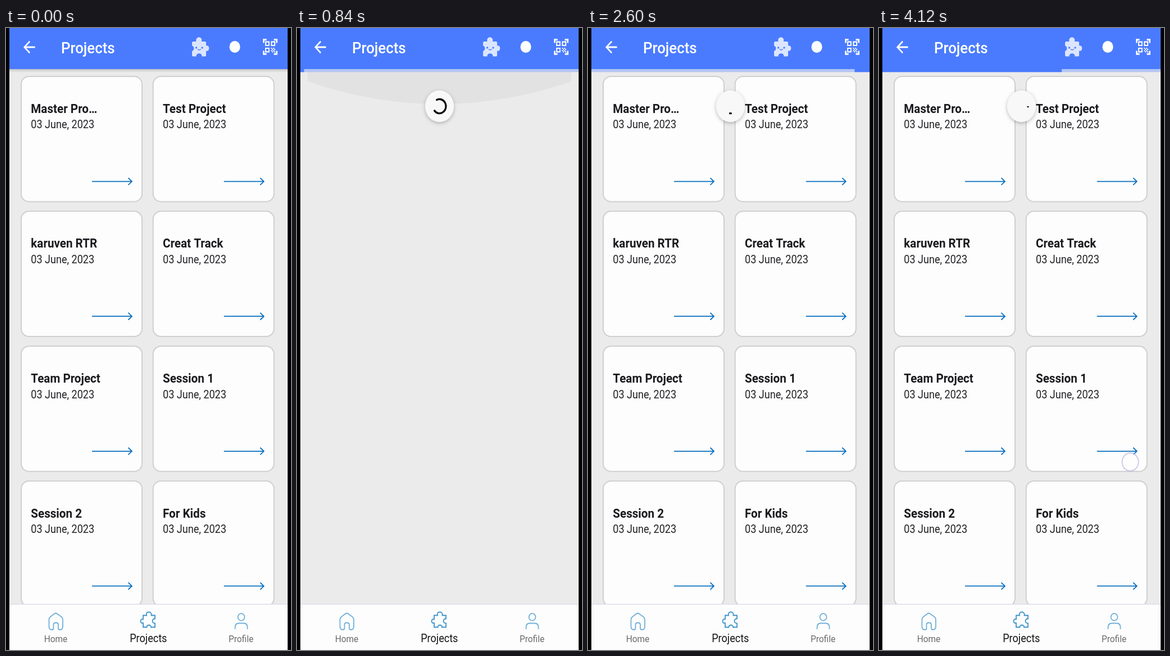
Animation of 507x1105 px, one loop 4160 ms. Source, as an HTML page with a canvas:

```html
<!DOCTYPE html>
<html lang="en">
<head>
<meta charset="utf-8">
<title>Projects</title>
<style>
  html, body { margin: 0; width: 100%; height: 100%; overflow: hidden; background: #000; }
  canvas { display: block; width: 100vw; height: 100vh; }
</style>
</head>
<body>
<canvas id="stage" width="507" height="1105"></canvas>
<script>
const ctx = document.getElementById('stage').getContext('2d');
const LOOP = 4160;
const LEFT = 6, WIDTH = 495, HEADER = 73, NAV = 1024;
const BLUE = '#4a7bff', LINK = '#0b70bf', INK = '#1a1a1e';
// The screen is slightly narrower than its natural proportions.
const DP = 1.418, SQUEEZE = 0.91;

const CARDS = ['Master Pro…', 'Test Project', 'karuven RTR', 'Creat Track',
  'Team Project', 'Session 1', 'Session 2', 'For Kids'];

const ICONS = {
  back: 'M20 11H7.83l5.59-5.59L12 4l-8 8 8 8 1.41-1.41L7.83 13H20z',
  scan: 'M2 7V2h5v2H4v3zM17 2h5v5h-2V4h-3zM22 17v5h-5v-2h3v-3zM7 22H2v-5h2v3h3z' +
    'M5 5h6v6H5zM6.5 6.5v3h3v-3zM13 5h6v6h-6zM14.5 6.5v3h3v-3zM5 13h6v6H5zM6.5 14.5v3h3v-3z' +
    'M13 13h1.5v1.5H13zM16 13h1.5v1.5H16zM14.5 14.5H16V16h-1.5zM17.5 14.5H19V16h-1.5z' +
    'M13 16h1.5v1.5H13zM16 16h1.5v1.5H16zM14.5 17.5H16V19h-1.5zM17.5 17.5H19V19h-1.5z',
  piece: 'M333 24H338.5C336 14 350.500 14 348 24H354Q356 24 356 26V31.500C363 29 363 43 356 40.500' +
    'V48.500Q356 50.500 354 50.500H348.500C349 43.500 338 43.500 338.500 50.500H333Q331 50.500 331 48.500' +
    'V41C335.500 40 335.500 32.500 331 31.500V26Q331 24 333 24Z',
  home: 'M76.5 1063V1051Q76.5 1048 79 1046L85.5 1041Q88.5 1038.5 91.5 1041L98.5 1046Q101 1048 101 1051' +
    'V1063Q101 1069 96 1069Q93 1069 93 1066V1060Q93 1056.5 88.7 1056.5Q84.5 1056.5 84.5 1060V1066' +
    'Q84.5 1069 81.5 1069Q76.5 1069 76.5 1063Z',
  projects: 'M244 1043.5H250C247.5 1035.500 260.500 1035.500 258.500 1043.5H265V1049.500' +
    'C259 1049 259 1058 265 1057.5V1064.5H258C258.500 1059.500 250 1059.500 250.500 1064.5H244V1057' +
    'C238 1059 238 1048.5 244 1050.5Z',
  profile: 'M407.5 1068V1065Q407.5 1057.5 414 1057.5H423Q429.5 1057.5 429.5 1065V1068' +
    'M412.500 1046.500a6 6.300 0 1 0 12 0a6 6.300 0 1 0 -12 0'
};

const clamp = (v, a = 0, b = 1) => Math.min(b, Math.max(a, v));
const ramp = (t, from, to) => clamp((t - from) / (to - from));
const smooth = x => x * x * (3 - 2 * x);

// Linear interpolation through [time, value] pairs.
function track(t, keys) {
  for (let i = 1; i < keys.length; i++) {
    const [t0, v0] = keys[i - 1], [t1, v1] = keys[i];
    if (t <= t1) return v0 + (v1 - v0) * ramp(t, t0, t1);
  }
  return keys[keys.length - 1][1];
}

function bezier(x, x1, y1, x2, y2) {
  const at = (s, a, b) => 3 * (1 - s) ** 2 * s * a + 3 * (1 - s) * s * s * b + s ** 3;
  let lo = 0, hi = 1;
  for (let i = 0; i < 20; i++) {
    const mid = (lo + hi) / 2;
    if (at(mid, x1, x2) < x) lo = mid; else hi = mid;
  }
  return at(lo, y1, y2);
}
const fastOutSlowIn = x => bezier(x, 0.4, 0, 0.2, 1);

function squeezed(x, y, paint, scale = 1) {
  ctx.save();
  ctx.translate(x, y);
  ctx.scale(SQUEEZE * scale, scale);
  paint();
  ctx.restore();
}

function rect(x, y, w, h, color) {
  ctx.fillStyle = color;
  ctx.fillRect(x, y, w, h);
}

function text(label, x, y, size, weight, color, align = 'left') {
  squeezed(x, y, () => {
    ctx.font = `${weight} ${size * DP}px Roboto, sans-serif`;
    ctx.textAlign = align;
    ctx.fillStyle = color;
    ctx.fillText(label, 0, 0);
  });
}

function stroke(path, color, width) {
  ctx.strokeStyle = color;
  ctx.lineWidth = width;
  ctx.stroke(new Path2D(path));
}

function glyph(path, x, y) {
  squeezed(x, y, () => {
    ctx.translate(-12, -12);
    ctx.fillStyle = '#fff';
    ctx.fill(new Path2D(path), 'evenodd');
  }, DP);
}

function disc(radius, color) {
  ctx.beginPath();
  ctx.arc(0, 0, radius, 0, Math.PI * 2);
  ctx.fillStyle = color;
  ctx.fill();
}

function card(title, index) {
  const x = 26 + (index % 2) * 234.7, y = 85 + (index >> 1) * 239.6;
  ctx.beginPath();
  ctx.roundRect(x + 1, y + 1, 215, 222.5, 14);
  ctx.fillStyle = '#fdfdfd';
  ctx.fill();
  ctx.strokeStyle = '#cfcfcf';
  ctx.lineWidth = 2;
  ctx.stroke();
  text(title, x + 18.3, y + 65.8, 16, 700, INK);
  text('03 June, 2023', x + 18.3, y + 93.3, 14, 400, '#222226');
  ctx.save();
  ctx.translate(x, y);
  stroke('M127 187.600H198M191.500 181.300L198 187.600L191.500 193.900', LINK, 1.8);
  ctx.restore();
}

function header() {
  const shade = ctx.createLinearGradient(0, HEADER, 0, HEADER + 6);
  shade.addColorStop(0, 'rgba(0,0,0,.16)');
  shade.addColorStop(1, 'rgba(0,0,0,0)');
  rect(LEFT, HEADER, WIDTH, 6, shade);
  rect(LEFT, 0, WIDTH, HEADER, BLUE);
  glyph(ICONS.back, 41.3, 34);
  text('Projects', 98, 45, 20, 500, '#fff');
  ctx.fillStyle = '#dbe5ff';
  ctx.fill(new Path2D(ICONS.piece));
  for (const x of [338.5, 349]) squeezed(x, 35, () => disc(1.8, BLUE));
  stroke('M341 37.500Q343.700 40.500 346.500 37.500', BLUE, 1.4);
  squeezed(407, 33.5, () => disc(10.5, '#fff'));
  glyph(ICONS.scan, 470, 33.5);
}

function navigation() {
  rect(LEFT, NAV, WIDTH, 81, '#fdfdfd');
  rect(LEFT, NAV - 1, WIDTH, 1.5, '#dedeea');
  stroke(ICONS.home, '#71b0d9', 1.8);
  stroke(ICONS.projects, '#3c93c9', 1.8);
  stroke(ICONS.profile, '#71b0d9', 1.8);
  text('Home', 88.5, 1090.5, 12, 400, '#6a6a6e', 'center');
  text('Projects', 253.3, 1090.5, 14, 400, '#151518', 'center');
  text('Profile', 418, 1090.5, 12, 400, '#6a6a6e', 'center');
}

function glow(t) {
  const alpha = 0.045 * ramp(t, 160, 440) * (1 - ramp(t, 800, 1120));
  if (!alpha) return;
  const sag = track(t, [[160, 0], [560, 28], [760, 38], [1120, 48]]);
  ctx.beginPath();
  ctx.moveTo(19, 78);
  ctx.lineTo(19, 95);
  ctx.quadraticCurveTo(253.5, 95 + 2 * sag, 488, 95);
  ctx.lineTo(488, 78);
  ctx.fillStyle = `rgba(0,0,0,${alpha})`;
  ctx.fill();
}

function progress(t) {
  if (t < 720) return;
  rect(LEFT, HEADER, WIDTH, 5.3, '#b4c5f3');
  const q = (t - 750 + 2000) % 2000;
  const bars = [
    [[[250, 0], [450, 0.119], [1290, 0.899], [1370, 1]], [[80, 0], [450, 0.444], [900, 1]]],
    [[[1400, 0], [1600, 0.5], [1800, 0.89], [1900, 1]], [[1140, 0], [1290, 0.432], [1360, 0.62], [1530, 1]]]
  ];
  if (t < 750) return;
  for (const [tail, head] of bars) {
    const from = track(q, tail), to = track(q, head);
    rect(LEFT + WIDTH * from, HEADER - 0.5, WIDTH * (to - from), 5.8, BLUE);
  }
}

const touchY = t => 395 + 317 * smooth(ramp(t, 120, 540));

function spinner(t) {
  const pull = clamp((touchY(t) - 410) / 237);
  if (!pull) return;
  const dragging = t < 600;
  const y = dragging ? 48 + 135 * pull : 183 - 44 * smooth(ramp(t, 600, 750));

  const path = ((t - 4120) / 1333 + 0.97 + 4);
  const phase = path % 1;
  const head = fastOutSlowIn(clamp(phase * 2)), tail = fastOutSlowIn(clamp(phase * 2 - 1));
  const spin = 93 + (t - 4120) / 2222 * 360;
  let start = -90 + 270 * tail + spin + 90 * phase;
  let sweep = Math.max(270 * (head - tail), 9);
  if (dragging) {
    start = -150 + 150 * (pull - 1);
    sweep = 300 * pull;
  }

  ctx.save();
  ctx.beginPath();
  ctx.rect(LEFT, HEADER, WIDTH, NAV - HEADER);
  ctx.clip();
  squeezed(253.5, y, () => {
    ctx.shadowColor = 'rgba(0,0,0,.26)';
    ctx.shadowBlur = 6;
    ctx.shadowOffsetY = 2;
    disc(28.2, '#f8f8f8');
    ctx.shadowColor = 'transparent';
    ctx.beginPath();
    ctx.arc(0, 0, 12.6, start * Math.PI / 180, (start + sweep) * Math.PI / 180);
    ctx.strokeStyle = '#050505';
    ctx.lineWidth = 3.4;
    ctx.stroke();
  });
  ctx.restore();
}

function touch(x, y) {
  squeezed(x, y, () => {
    disc(16, 'rgba(255,255,255,.6)');
    ctx.strokeStyle = 'rgba(176,176,222,.65)';
    ctx.lineWidth = 2;
    ctx.stroke();
  });
}

function draw(t) {
  rect(0, 0, 507, 1105, '#000');
  rect(LEFT, 0, WIDTH, 1105, '#ebebeb');
  if (t < 720 || t >= 1000) CARDS.forEach(card);
  glow(t);
  header();
  progress(t);
  spinner(t);
  navigation();
  if (t >= 120 && t < 600) touch(254 + 12 * ramp(t, 120, 540), touchY(t));
  if (t >= 4080) touch(447, 771);
}

const began = performance.now();
function tick() {
  draw((performance.now() - began) % LOOP);
  requestAnimationFrame(tick);
}
tick();
</script>
</body>
</html>
```
